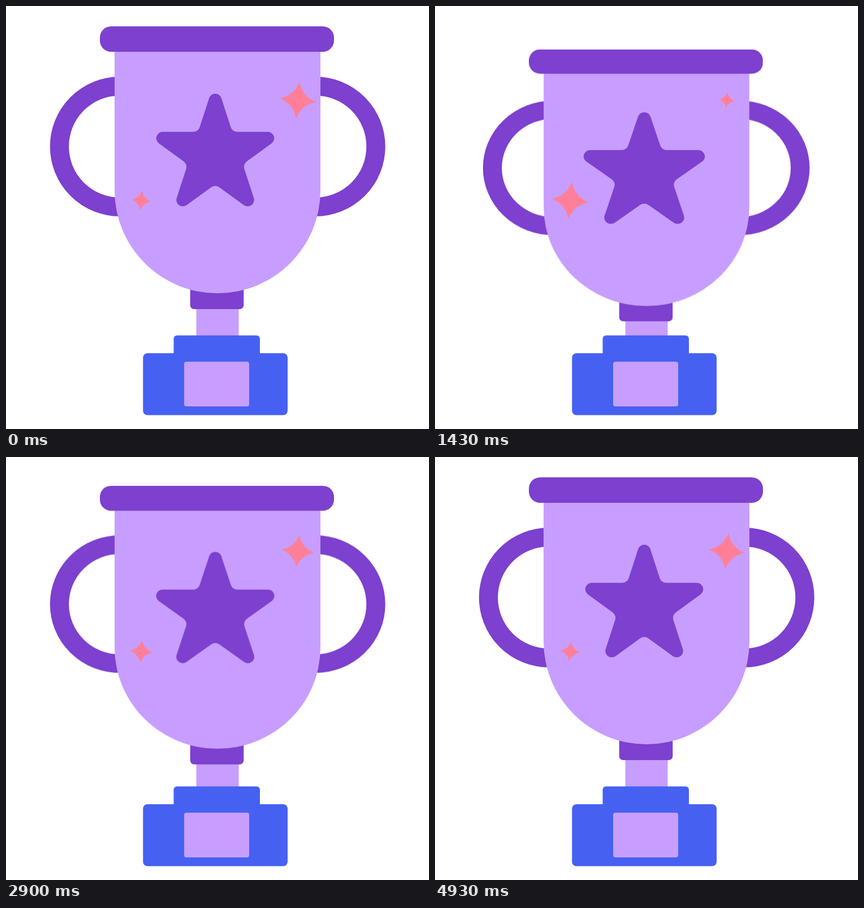
Recreate the animation shown at these times as an HTML page. Size 748 by 748 pixels, loop 5.01 s.

```html
<!DOCTYPE html>
<html lang="en">
<head>
<meta charset="utf-8">
<title>Trophy</title>
<style>
  html, body { margin: 0; width: 100%; height: 100%; overflow: hidden; background: #fff; }
  svg { display: block; width: 100%; height: 100%; }

  .dark { fill: #7d40cf; }
  .light { fill: #c79eff; }
  .blue { fill: #4661f2; }
  .pink { fill: #ff7f98; }
  .handle { fill: none; stroke: #7d40cf; stroke-width: 33.4; }

  #cup, .handle, #star, .spark {
    animation: 5010ms cubic-bezier(.333, 0, .667, 1) infinite;
  }
  #cup { animation-name: squash; transform-origin: 373.5px 536px; }
  #left { animation-name: left; }
  #right { animation-name: right; }
  #star { animation-name: swell; }
  #sparkA { animation-name: shrink; }
  #sparkB { animation-name: grow; }

  @keyframes squash {
    0%, 67.2%, 100% { transform: translateY(0) scale(1, 1); }
    15.97%, 26.95% { transform: translateY(22.3px) scale(1, .96); }
    40.72%, 43.31% { transform: translateY(0) scale(.976, 1.012); }
    50.5% { transform: translateY(12.7px) scale(1, .975); }
  }
  @keyframes left {
    0%, 50.5%, 100% { transform: translate(0, 0); }
    2.6% { transform: translate(-2.5px, 0); }
    15.97%, 26.95% { transform: translate(7px, 5.8px); }
    40.72%, 43.31% { transform: translate(-1.3px, -.8px); }
  }
  @keyframes right {
    0%, 50.5%, 100% { transform: translate(0, 0); }
    15.97%, 26.95% { transform: translate(-8.4px, 5.8px); }
    40.72%, 43.31% { transform: translate(1px, -.8px); }
  }
  @keyframes swell {
    0%, 67.2%, 100% { transform: scale(1); }
    15.97%, 26.95% { transform: scale(1.03); }
    40.72%, 50.5% { transform: scale(1.005); }
  }

  /* Sparkles: quick away from the start size, slow around the turn */
  @keyframes shrink {
    0%, 51.9% { transform: scale(32.7); animation-timing-function: cubic-bezier(.35, 0, .5, 1); }
    25.95%, 75.25%, 77.84% { transform: scale(13.7); animation-timing-function: cubic-bezier(.5, 0, .65, 1); }
    99.8%, 100% { transform: scale(32.7); }
  }
  @keyframes grow {
    0%, 51.9% { transform: scale(17.2); animation-timing-function: cubic-bezier(.35, 0, .5, 1); }
    25.95%, 75.25%, 77.84% { transform: scale(33.2); animation-timing-function: cubic-bezier(.5, 0, .65, 1); }
    99.8%, 100% { transform: scale(17.2); }
  }
</style>
</head>
<body>
<svg viewBox="0 0 748 748">
  <defs>
    <path id="spark" transform="rotate(5.5)"
      d="M0-1Q.22-.22 1 0Q.22.22 0 1Q-.22.22-1 0Q-.22-.22 0-1Z"/>
  </defs>

  <g id="cup">
    <circle id="left" class="handle" cx="201.3" cy="248.5" r="106.8"/>
    <circle id="right" class="handle" cx="547.2" cy="248.5" r="106.8"/>
    <rect class="light" x="336.5" y="500" width="75" height="120"/>
    <rect class="dark" x="325.7" y="480" width="94.6" height="56" rx="7"/>
    <path class="light" d="M192 60H556V326A182 182 0 0 1 192 326Z"/>
    <rect class="dark" x="166" y="36" width="414" height="45" rx="20"/>
    <g transform="translate(370 264)"><path id="star" class="dark"/></g>
  </g>

  <g class="blue">
    <rect x="296.5" y="582.5" width="152.5" height="60" rx="6"/>
    <rect x="242.3" y="614" width="255.7" height="109.5" rx="8"/>
  </g>
  <rect class="light" x="315" y="629" width="115" height="79" rx="4"/>

  <g class="pink">
    <g transform="translate(516 166.5)"><g id="sparkA" class="spark"><use href="#spark"/></g></g>
    <g transform="translate(239 344)"><g id="sparkB" class="spark"><use href="#spark"/></g></g>
  </g>
</svg>
<script>
  // Rounded star: one arm, turned five times
  const spin = (x, y, a) =>
    `${(x * Math.cos(a) - y * Math.sin(a)).toFixed(2)} ${(x * Math.sin(a) + y * Math.cos(a)).toFixed(2)}`;
  let d = '';
  for (let i = 0; i <= 5; i++) {
    const a = i * Math.PI * 0.4;
    d += (i ? 'A12 12 0 0 0 ' : 'M') + spin(-27.46, -49.8, a);
    if (i < 5) {
      d += 'L' + spin(-10.75, -101.2, a) +
           'A11.3 11.3 0 0 1 ' + spin(10.75, -101.2, a) +
           'L' + spin(27.46, -49.8, a);
    }
  }
  document.getElementById('star').setAttribute('d', d + 'Z');

  // Hold poses in a 30 / 70 ms rhythm
  const LOOP = 5010, LAST = 4930;
  const moves = document.getAnimations();
  moves.forEach(m => m.pause());

  function draw() {
    const t = performance.now() % LOOP;
    const pose = Math.floor(t / 100) * 100 + (t % 100 >= 30 ? 30 : 0);
    moves.forEach(m => { m.currentTime = Math.min(pose, LAST); });
    requestAnimationFrame(draw);
  }
  draw();
</script>
</body>
</html>
```
